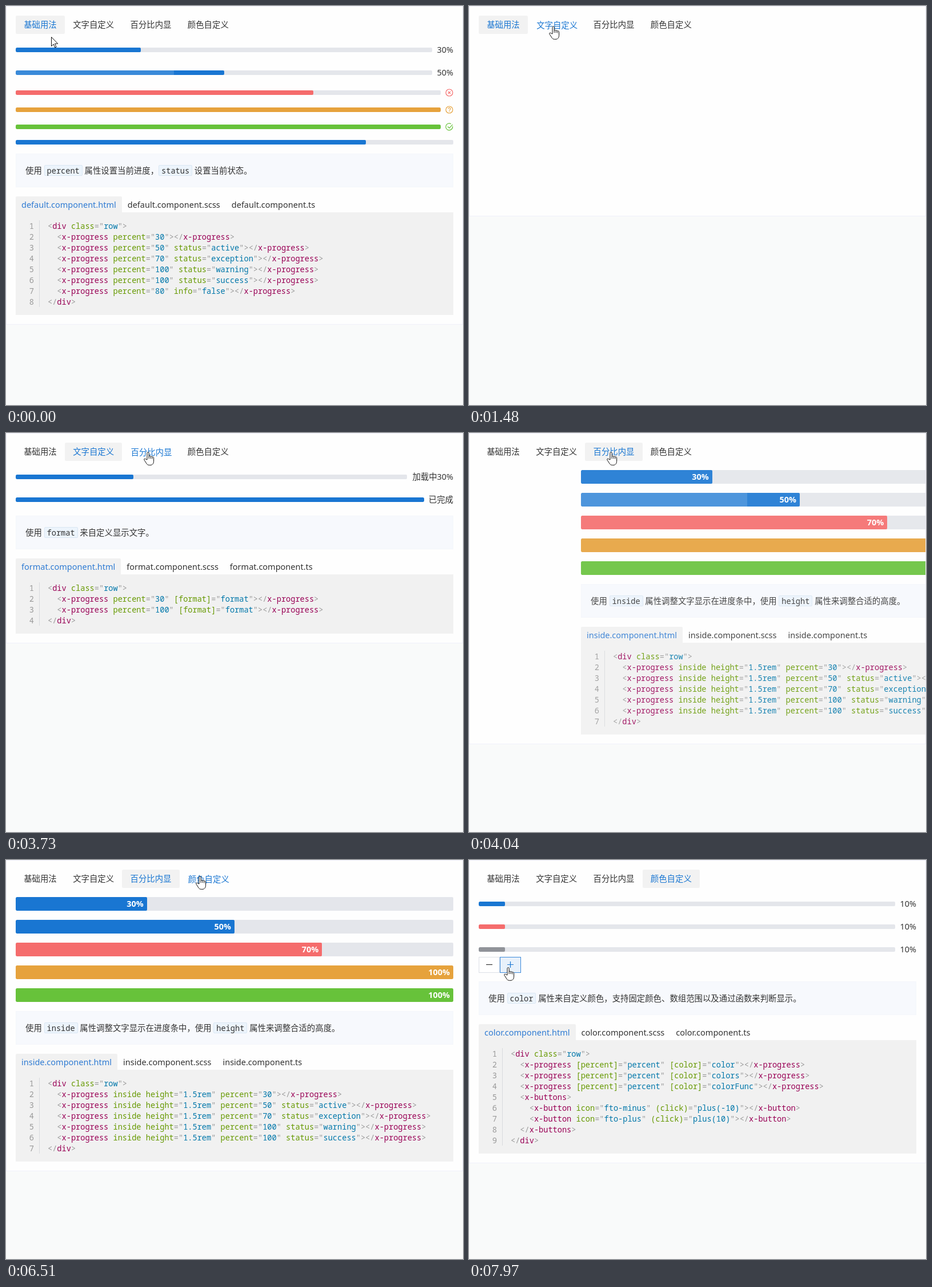
An HTML page that plays this animation: 800 by 700 pixels, repeating every 8000 ms.

```html
<!DOCTYPE html>
<html lang="zh-CN">
<head>
<meta charset="utf-8">
<title>Progress</title>
<style>
html, body { margin: 0; width: 100%; height: 100%; overflow: hidden; background: #f9fafa; }
body { position: relative; color: #333; font: 14.4px/20px 'Noto Sans', 'Noto Sans CJK SC', sans-serif; white-space: pre; }
div, svg { position: absolute; box-sizing: border-box; }
code, .code { font: 13.63px/19px 'Noto Sans Mono', monospace; }
#card { left: 0; top: 0; width: 800px; background: #fefefe; border: 1px solid #f0f0fa; overflow: hidden; }
.page { left: -1px; top: -1px; width: 800px; height: 600px; }
#counters { width: 800px; }
#tabs { left: 17px; top: 17px; display: flex; }
#tabs span { padding: 0 14.2px; height: 32px; line-height: 32px; border-radius: 2px; }
#tabs .selected { background: #f2f2f2; }
#tabs .selected, #tabs .hover { color: #1976d2; }
#tabs i { font-style: normal; position: relative; }
#tabs .pressed i { left: 1px; top: 1px; }
.track { left: 17px; background: #e4e6eb; border-radius: 2px; overflow: hidden; }
.fill { left: 0; top: 0; height: 100%; border-radius: 2px; }
.inside { right: 6px; top: 2px; color: #fff; font-weight: 600; }
.shine { left: 0; top: 0; height: 100%; background: #fff; }
.label { right: 17px; }
.note { left: 17px; width: 766px; height: 59px; padding-left: 16px; line-height: 57px; background: #f7f9fd; border: 1px solid #f4f6fb; }
.note code { display: inline-block; line-height: 17px; padding: 0 4px; background: #ecf4fc; border: 1px solid #dae7f3; border-radius: 2px; }
.files { left: 17px; display: flex; font-size: 14.5px; line-height: 28px; }
.files span { padding: 0 10px; }
.files span:first-child { background: #f1f1f1; color: #2f7bd3; border-radius: 2px 2px 0 0; }
.code { left: 17px; width: 766px; padding: 14px 0 14px 56px; background: #f1f1f1; }
.numbers { left: 0; top: 14px; width: 42px; padding-right: 9px; text-align: right; color: #999; border-right: 1px solid #d8dadd; }
.p { color: #999; } .t { color: #905; } .a { color: #690; } .v { color: #07a; }
.button { top: 170px; width: 37px; height: 28px; background: #fff; border: 1px solid #dcdfe6; }
.button.hover { background: #e8f1fb; border-color: #3c8ada; color: #1976d2; }
.button svg { left: 10px; top: 5px; }
svg { overflow: visible; fill: none; stroke: currentColor; stroke-width: 1.2; }
.cursor { fill: #fff; stroke: #111; stroke-width: 1; }
</style>
</head>
<body>
<div id="card"></div>
<div id="tabs"></div>
<svg id="arrow" class="cursor" width="13" height="20"><path d="M.5.5v16l3.7-3.5 2.5 6 2.4-1-2.6-5.9h5.2z"/></svg>
<svg id="hand" class="cursor" width="19" height="24"><path d="M6 14V2.3a1.6 1.6 0 0 1 3.2 0V8c.5-1.1 2.8-1 3 .4.6-.9 2.6-.7 2.8.8.8-.7 2.6-.3 2.6 1.3V16c0 4.5-2.2 7.3-5.6 7.3H9.500c-2.4 0-3.7-1.2-4.8-3.2L1 14.3c-1-1.9 1-3 2.3-1.7z"/><path d="M9.2 8v4M12.2 8.5V12M15 9.5v3"/></svg>
<script>
const TICK = 77.4, LOOP = 8000;
const BLUE = '#1976d2', RED = '#f56c6c', ORANGE = '#e6a23c', GREEN = '#67c23a', GRAY = '#909399';
const $ = id => document.getElementById(id);
const span = (cls, text) => `<span class="${cls}">${text.replace(/</g, '&lt;')}</span>`;

const highlight = line => line.replace(/="[^"]*"|[<>\/]+|[\w\[\]().-]+/g, (token, at) => {
  if (token[0] === '=') return span('p', '="') + span('v', token.slice(2, -1)) + span('p', '"');
  if (/[<>\/]/.test(token)) return span('p', token);
  return span(/[<\/]/.test(line[at - 1] || '') ? 't' : 'a', token);
});

const track = (y, h, end, percent, color, content = '') =>
  `<div class="track" style="top:${y}px;width:${end - 17}px;height:${h}px">` +
  `<div class="fill" style="width:${percent}%;background:${color}">${content}</div></div>`;
const label = (y, text) => `<div class="label" style="top:${y - 6}px">${text}</div>`;
const thin = (y, end, percent, color, text = '', content = '') =>
  track(y, 8, end, percent, color, content) + label(y, text);
const thick = (y, percent, color, content = '') =>
  track(y, 24, 783, percent, color, `${content}<div class="inside">${percent}%</div>`);
const icon = (y, color, path) =>
  `<svg style="left:769px;top:${y}px;color:${color}" width="14" height="14"><path d="${path}"/></svg>`;
const iconButton = (id, x, path) => `<div class="button" id="${id}" style="left:${x}px">` +
  `<svg width="14" height="14"><path d="${path}"/></svg></div>`;
const RING = 'M13 7A6 6 0 1 1 1 7a6 6 0 1 1 12 0';
const SHINE = '<div class="shine"></div>';

// Note, file tabs and source listing stacked below the demo
function docs(y, name, note, source) {
  const lines = ['<div class="row">', ...source.map(s => '  ' + s), '</div>'];
  const files = ['html', 'scss', 'ts'].map(ext => `<span>${name}.component.${ext}</span>`).join('');
  return `<div class="note" style="top:${y}px">${note.replace(/`(\w+)`/g, '<code>$1</code>')}</div>` +
    `<div class="files" style="top:${y + 75}px">${files}</div>` +
    `<div class="code" style="top:${y + 103}px"><div class="numbers">${lines.map((_, i) => i + 1).join('\n')}</div>` +
    `${lines.map(highlight).join('\n')}</div>`;
}
const progress = attrs => `<x-progress ${attrs}></x-progress>`;
const buttonTag = (name, step) => `  <x-button icon="fto-${name}" (click)="plus(${step})"></x-button>`;
const statuses = ['percent="50" status="active"', 'percent="70" status="exception"',
  'percent="100" status="warning"', 'percent="100" status="success"'];

const pages = [
  { title: '基础用法', height: 559, html:
    thin(73, 746, 30, BLUE, '30%') + thin(113, 746, 50, BLUE, '50%', SHINE) +
    thin(148, 761, 70, RED) + icon(145, RED, RING + 'M4.8 4.8l4.4 4.4M9.2 4.8l-4.4 4.4') +
    thin(178, 761, 100, ORANGE) + icon(175, ORANGE, RING + 'M5 5.5a2 2 0 1 1 3 1.7q-1 .5-1 1.3M7 9.5v1.2') +
    thin(208, 761, 100, GREEN) + icon(205, GREEN, 'M12.8 6A6 6 0 1 1 10 1.8M4.3 6.5L7 9.2l5.7-6') +
    thin(235, 783, 80, BLUE) +
    docs(259, 'default', '使用 `percent` 属性设置当前进度，`status` 设置当前状态。',
      ['percent="30"', ...statuses, 'percent="80" info="false"'].map(progress)) },
  { title: '文字自定义', height: 369, html:
    thin(73, 702, 30, BLUE, '加载中30%') + thin(113, 732, 100, BLUE, '已完成') +
    docs(145, 'format', '使用 `format` 来自定义显示文字。',
      [30, 100].map(n => progress(`percent="${n}" [format]="format"`))) },
  { title: '百分比内显', height: 546, html:
    thick(65, 30, BLUE) + thick(105, 50, BLUE, SHINE) + thick(145, 70, RED) +
    thick(185, 100, ORANGE) + thick(225, 100, GREEN) +
    docs(265, 'inside', '使用 `inside` 属性调整文字显示在进度条中，使用 `height` 属性来调整合适的高度。',
      ['percent="30"', ...statuses].map(s => progress('inside height="1.5rem" ' + s))) },
  { title: '颜色自定义', height: 532, html:
    '<div id="counters"></div>' +
    iconButton('minus', 17, 'M2 7.5h11') + iconButton('plus', 54, 'M2 7.5h11M7.5 2v11') +
    docs(213, 'color', '使用 `color` 属性来自定义颜色，支持固定颜色、数组范围以及通过函数来判断显示。',
      [...['color', 'colors', 'colorFunc'].map(c => progress(`[percent]="percent" [color]="${c}"`)),
        '<x-buttons>', buttonTag('minus', -10), buttonTag('plus', 10), '</x-buttons>']) },
];
$('card').innerHTML = pages.map(p => `<div class="page">${p.html}</div>`).join('');
$('tabs').innerHTML = pages.map(p => `<span><i>${p.title}</i></span>`).join('');
const pageEls = [...document.querySelectorAll('.page')];
const tabEls = [...$('tabs').children];

// Ticks at which each tab is pressed, its page swapped in, and the slide begins
const switches = [
  { press: -9, swap: -9, show: -9 },
  { press: 15, swap: 19, show: 20 },
  { press: 47, swap: 51, show: 52 },
  { press: 80, swap: 85, show: 86 },
];
// Cursor stops: tick, x, y
const path = [[3, 79, 54], [7, 140, 35], [23, 140, 35], [25, 187, 35], [29, 241, 33], [61, 241, 33],
  [66, 319, 29], [68, 332, 29], [70, 332, 28], [89, 332, 28], [90, 319, 56], [100, 61, 188]];

function cursorAt(n) {
  const i = path.findIndex(k => k[0] > n);
  if (i < 0) return path[path.length - 1].slice(1);
  if (i === 0) return path[0].slice(1);
  const a = path[i - 1], b = path[i], u = (n - a[0]) / (b[0] - a[0]);
  return [1, 2].map(j => Math.round(a[j] + (b[j] - a[j]) * u));
}
const hoveredTab = n => n < 6 ? -1 : n < 27 ? 1 : n < 64 ? 2 : n < 67 ? -1 : n < 90 ? 3 : -1;
const latest = (n, key) => switches.filter(s => n >= s[key]).length - 1;

function render(n) {
  const current = latest(n, 'swap'), selected = latest(n, 'show'), hovered = hoveredTab(n);
  $('card').style.height = pages[current].height + 'px';
  pageEls.forEach((el, i) => {
    const k = n - switches[i].show;
    el.style.display = i === current ? '' : 'none';
    el.style.opacity = k < 0 ? 0 : k < 5 ? 1 - .1 * .3 ** k : 1;
    el.style.transform = k >= 0 && k < 5 ? `translateX(${Math.round(179 * .32 ** k)}px)` : '';
  });
  tabEls.forEach((el, i) => {
    el.classList.toggle('selected', i === selected);
    el.classList.toggle('hover', i === hovered);
    el.classList.toggle('pressed', n >= switches[i].press && n < switches[i].show);
  });

  const phase = current === 0 ? n + 4 : (n + 2) % 25;
  const reach = 1 - .7 ** phase;
  document.querySelectorAll('.shine').forEach(el => {
    el.style.width = reach * 100 + '%';
    el.style.opacity = phase < 5 ? .6 * (1 - reach) : 0;
  });

  const clicked = n >= 102, percent = n < 102 ? 0 : n < 103 ? 1.2 : 6.3;
  $('counters').innerHTML = [BLUE, RED, GRAY].map((color, i) =>
    thin(73 + 40 * i, clicked ? 746 : 754, percent, color, clicked ? '10%' : '0%')).join('');
  $('plus').classList.toggle('hover', n >= 99);

  const [x, y] = cursorAt(n), isArrow = n < 6 || (n >= 90 && n < 99);
  $('arrow').style.display = isArrow ? '' : 'none';
  $('hand').style.display = isArrow ? 'none' : '';
  for (const id of ['arrow', 'hand']) {
    $(id).style.left = x + 'px';
    $(id).style.top = y + 'px';
  }
}

let shown = -1;
function loop() {
  const n = Math.floor((performance.now() % LOOP + 3) / TICK);
  if (n !== shown) render(shown = n);
  requestAnimationFrame(loop);
}
loop();
</script>
</body>
</html>
```
